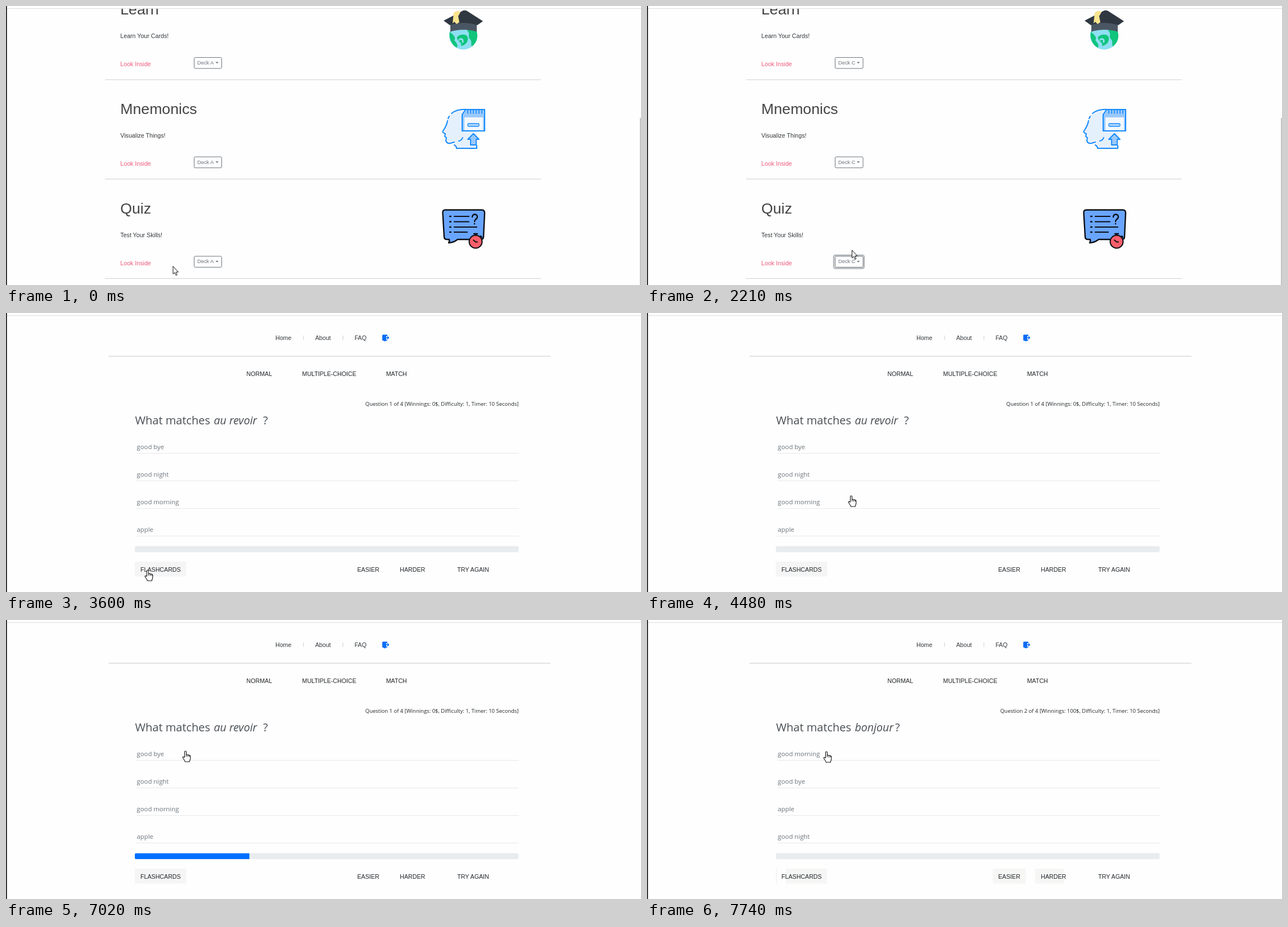
Write an HTML page that moves like this. It is 1129x496 px and loops after 8 s.

```html
<!DOCTYPE html>
<html lang="en">
<head>
<meta charset="utf-8">
<title>Flashcard quiz</title>
<style>
html, body { margin: 0; width: 100%; height: 100%; overflow: hidden; background: #fefefe; }
svg { display: block; width: 1129px; height: 496px; }
text { font: 10.67px "Liberation Sans", Arial, sans-serif; fill: #33383c; white-space: pre; }
.h { font-size: 26.67px; fill: #444; }
.link { fill: #ef5a7c; }
.btn { font-size: 9.33px; fill: #6c757d; }
.ui { font-family: "Open Sans", "Noto Sans", sans-serif; }
.info { font-size: 9.49px; fill: #212529; text-anchor: end; }
.ask { font-size: 20px; fill: #4a4f54; }
.opt { font-size: 11.35px; fill: #6c757d; }
.cap { fill: #212529; }
.rule { stroke: #d3d3d3; }
</style>
</head>
<body>
<svg id="stage" viewBox="0 0 1129 496"></svg>
<script>
const LOOP = 8000, PITCH = 176.7, BAR = 682.5;

// Cursor moves: first change, last change, number of steps, x and y reached
const MOVES = [
  [120, 600, 5, 355, 461], [750, 750, 1, 376, 445], [900, 1140, 3, 388, 425],
  [1700, 1820, 2, 388, 425], [1970, 2210, 3, 364, 434], [2360, 2600, 3, 299, 451],
  [2750, 2750, 1, 281, 453], [2900, 3020, 2, 251, 457], [3170, 3300, 2, 251, 457],
  [3450, 3450, 1, 252, 457], [3600, 3600, 1, 252, 457], [3750, 4480, 7, 363, 325],
  [4630, 4750, 2, 384, 271], [4900, 5140, 3, 383.5, 266], [5420, 5420, 1, 384.5, 266],
  [5570, 5930, 4, 385, 263], [6080, 6210, 2, 386, 263], [6360, 6600, 3, 352, 258],
  [6740, 6740, 1, 333, 245], [6900, 7020, 2, 319, 233], [7170, 7170, 1, 319, 233],
  [7320, 7320, 1, 319, 234], [7470, 7470, 1, 319, 234], [7620, 7740, 2, 319, 234]
];

const text = (x, y, s, cls = '', id = '') => `<text x="${x}" y="${y}" class="${cls}" id="${id}">${s}</text>`;
const rect = (x, y, w, h, fill, more = '') =>
  `<rect x="${x}" y="${y}" width="${w}" height="${h}" fill="${fill}" ${more}/>`;
const path = (d, fill = 'none', stroke = 'none', w = 1, more = '') =>
  `<path d="${d}" fill="${fill}" stroke="${stroke}" stroke-width="${w}" stroke-linejoin="round" stroke-linecap="round" ${more}/>`;
const hline = (x1, x2, y, color, w = 1) => path(`M${x1} ${y}H${x2}`, 'none', color, w);

function gradIcon() {
  return '<circle cx="813" cy="52.5" r="25" fill="#8edff2"/>' +
    path('M814 28C828 29 838 39 838 53C838 61 834 68 828 72C826 66 829 63 825 59C820 54 826 50 821 45Z', '#10c47c') +
    path('M789 46C787 58 792 68 801 74C805 71 801 65 797 61C801 57 795 50 789 46Z', '#10c47c') +
    path('M802 55C807 50 817 49 820 54C824 60 818 70 809 71C812 64 801 63 802 55Z', '#10c47c') +
    path('M806 60C809 57 813 59 812 64', 'none', '#8edff2', 3) +
    path('M790 25H837V46C825 41 802 41 790 46Z', '#4a5663') +
    path('M778 26L813 8Q817 7 820 9L848 27L838 34Q813 26 789 34Z', '#2f3741') +
    path('M796 12Q803 6 808 11L804 18L806 29L801 32L797 28L794 31Z', '#f9e48f');
}

function headIcon() {
  const blue = '#1389fd';
  return path('M811 185C796 186 787 193 784 204C783 211 782 214 777 222Q775 225 781 227L780 232L783 234L782 239Q783 245 790 244C798 241 802 245 801 253H837L838 222H811Z', '#e5f0fd') +
    path('M820 184C807 183 797 187 792 191M788 196L786 200M785 204C784 211 782 215 777 222Q775 225 781 227L780 232L783 234L782 239Q783 245 790 244L797 242M797 247Q801 249 801 253H837V248M805 240Q810 239 812 234', 'none', blue, 2) +
    path('M811 193L817 184H851V222H811Z', '#9ac9fb', blue, 2) +
    path('M821 185v6M826 185v6M831 185v6M836 185v6M841 185v6M846 185v6', 'none', blue, 1.6) +
    rect(815, 198, 33, 23, '#f3f8ff') +
    rect(821, 209, 20, 5, '#b4d7fc', `rx="1.5" stroke="${blue}" stroke-width="1.3"`) +
    path('M831 227L841 237H836V247H826V237H821Z', '#9ac9fb', blue, 1.8);
}

function quizIcon() {
  const ink = '#0b0d12';
  return path('M781 362.5H846Q851 362.5 851 368L849 410Q849 415 844 415H803Q795 421 787 421Q789 419 788 415H784Q779 415 779 410L776.500 368Q776 362.500 781 362.500Z', '#69a5ff', ink, 2.4) +
    path('M797 374H823M797 383.500H823M797 393H837M797 402H820', 'none', ink, 2.2) +
    path('M789 374h2M789 383.500h2M789 393h2M789 402h2', 'none', ink, 2.4) +
    path('M829 375C829 369 838 369 838 375C838 379 833 379 833 383M833 387v.2', 'none', ink, 2.4) +
    path('M832 405H838M835 405V409M844 409L846 411', 'none', ink, 2.4) +
    `<circle cx="835" cy="419" r="11.500" fill="#fb5f6b" stroke="${ink}" stroke-width="2"/>` +
    path('M831 416L835 419.500H838', 'none', ink, 1.8);
}

const deckButton = i => rect(334.5, 91.5, 49, 19.5, '#fefefe', `rx="2" stroke="#6c757d" stroke-width="1" id="btn${i}"`) +
  text(340, 104, 'Deck A', 'btn', 'deck' + i) +
  path('M372.500 99.500h5.400l-2.700 2.800z', '#6c757d', 'none', 1, `id="caret${i}"`);

function section(i, title, line) {
  return `<g transform="translate(0 ${i * PITCH})">` +
    text(203.3, 15.2, title, 'h') + text(203.3, 57.4, line) +
    text(203.3, 107.4, 'Look Inside', 'link', 'link' + i) + deckButton(i) +
    hline(176.5, 950.5, 131, '#cdcdcd') + '</g>';
}

function homePage() {
  return '<g id="home">' +
    rect(332, 443, 54, 23.5, 'none', 'rx="3" stroke="#6c757d" stroke-opacity=".5" stroke-width="2.4" id="ring"') +
    section(0, 'Learn', 'Learn Your Cards!') +
    section(1, 'Mnemonics', 'Visualize Things!') +
    section(2, 'Quiz', 'Test Your Skills!') +
    gradIcon() + headIcon() + quizIcon() +
    '<g id="menu">' + rect(339.5, 368, 105, 74.5, '#fff', 'rx="2.5" stroke="#d9dde2"') +
    rect(340, 416.5, 104, 21.3, '#e9ecef', 'id="hover"') +
    ['A', 'B', 'C'].map((c, i) => text(350.2, 387.8 + i * 21.3, 'Deck ' + c, 'cap')).join('') + '</g>' +
    rect(1127, 199, 2, 297, '#c4c4c4') + '</g>';
}

function quizPage() {
  const nav = text(479, 48, 'Home') + text(549.7, 48, 'About') + text(619.7, 48, 'FAQ') +
    path('M529 40.500V47.500M599 40.500V47.500', 'none', '#ccc') +
    path('M670 38.500H678V41H676V47.500H678V49H676L674 50.500L669 48.500V39.500Z', '#0a6cf5') +
    path('M676 44H680.500M678.500 42L680.500 44L678.500 46', 'none', '#0a6cf5', 1.6);
  const tabs = [[427.5, 'NORMAL'], [526.5, 'MULTIPLE-CHOICE'], [675.7, 'MATCH']]
    .map(([x, s]) => text(x, 112, s, 'cap')).join('');
  const buttons = [[239, 'FLASHCARDS'], [624.5, 'EASIER'], [700.3, 'HARDER'], [802.3, 'TRY AGAIN']]
    .map(([x, s]) => text(x, 460, s, 'cap')).join('');
  const options = [0, 1, 2, 3].map(i =>
    text(232.5, 241.5 + i * 49, '', 'ui opt', 'opt' + i) + hline(232, 911.5, 249.5 + i * 49, '#e7e8e9')).join('');
  return '<g id="quiz">' + nav + hline(183, 967.5, 76.7, '#dadada', 1.5) + tabs +
    text(911.5, 164.6, '', 'ui info', 'info') +
    text(229.5, 197.6, 'What matches', 'ui ask') +
    `<text x="369.5" y="197.6" class="ui ask" style="font-style:italic;font-size:19.6px" id="word"></text>` +
    text(457, 197.6, '?', 'ui ask', 'mark') + options +
    rect(229, 414.5, BAR, 10.7, '#e9ecef', 'rx="2.7"') +
    rect(229, 414.5, 0, 10.7, '#0070ff', 'id="bar" clip-path="url(#track)"') +
    rect(229, 442, 91.5, 26.5, '#f5f5f5', 'rx="2" id="flash"') +
    rect(229, 442, 2.5, 26.5, '#f5f5f5') +
    '<g id="extra">' + rect(247, 442, 73, 26.5, '#f6f6f5', 'rx="1"') +
    rect(614.5, 442, 59, 26.5, '#f6f6f5', 'rx="2"') + rect(690, 442, 52, 26.5, '#f6f6f5', 'rx="1"') + '</g>' +
    buttons + '</g>';
}

const stage = document.getElementById('stage');
stage.innerHTML =
  `<defs><clipPath id="track">${rect(229, 414.5, BAR, 10.7, '#000', 'rx="2.7"')}</clipPath></defs>` +
  rect(0, 0, 1129, 496, '#fefefe') + homePage() + quizPage() +
  rect(0, 0, 1129, 5, '#fff') + hline(0, 1129, 4.5, '#dcdcdc') + rect(0, 0, 1.6, 496, '#0c0c0c') +
  '<g id="cursor">' +
  path('M.5 .5V14L3.500 11.300L5.700 16.300L7.800 15.400L5.600 10.500H9.500Z', '#fff', '#111', 1, 'id="arrow"') +
  '<g id="hand">' +
  path('M-1.500 11V1.500a1.500 1.500 0 0 1 3 0V7c.3-1.200 2.800-1 2.900.4c.4-1 2.600-.8 2.700.6c.5-.8 1.700-.4 1.700 1v4c0 2-1.300 3-1.500 6h-8c-.4-2.500-2.700-5-3.900-7c-.8-1.400.8-2.500 1.800-1.400z', '#fff', '#111', 1.1) +
  path('M1.500 7v2.500M4.400 7.400v2.500M7.100 8v2', 'none', '#111') + '</g></g>';

const el = {};
stage.querySelectorAll('[id]').forEach(n => { if (n.id) el[n.id] = n; });
const show = (n, on) => { n.style.display = on ? '' : 'none'; };
const write = (n, s) => { if (n.textContent !== s) n.textContent = s; };
const inside = (p, x1, y1, x2, y2) => p.x >= x1 && p.x <= x2 && p.y >= y1 && p.y <= y2;

// Cursor place and the moment of the latest screen step
function stepAt(t) {
  let x = 296.5, y = 462.5, time = 0;
  for (const [t0, t1, n, tx, ty] of MOVES) {
    if (t < t0) break;
    const gap = n > 1 ? (t1 - t0) / (n - 1) : 1;
    const k = Math.min(n - 1, Math.floor((t - t0) / gap + 0.001));
    const f = (k + 1) / n;
    x += (tx - x) * f;
    y += (ty - y) * f;
    time = t0 + k * gap;
  }
  return { x, y, time };
}

// cubic-bezier(.25, .1, .25, 1)
function ease(x) {
  if (x <= 0) return 0;
  if (x >= 1) return 1;
  const curve = (a, b, s) => 3 * a * s * (1 - s) ** 2 + 3 * b * s * s * (1 - s) + s ** 3;
  let lo = 0, hi = 1;
  for (let i = 0; i < 20; i++) {
    const mid = (lo + hi) / 2;
    if (curve(.25, .25, mid) < x) lo = mid; else hi = mid;
  }
  return curve(.1, 1, lo);
}

function barWidth(t) {
  const ticks = [4550, 5515, 6515].reduce((sum, t0) => sum + ease((t - t0) / 600), 0);
  return BAR / 10 * ticks * (1 - ease((t - 7110) / 540));
}

function drawHome(t, p) {
  const open = t >= 600 && t < 1820;
  const onMenu = open && inside(p, 340, 374, 444, 438);
  const onButton = inside(p, 334, 444.5, 384.5, 465);
  const onLink = inside(p, 203, 450, 258, 465);
  const deck = t >= 1820 ? 'Deck C' : 'Deck A';
  for (let i = 0; i < 3; i++) {
    write(el['deck' + i], deck);
    el['btn' + i].setAttribute('width', t >= 1820 ? 49.6 : 49);
    el['caret' + i].setAttribute('transform', `translate(${t >= 1820 ? .5 : 0} 0)`);
  }
  el.btn2.setAttribute('fill', onButton ? '#6c757d' : '#fefefe');
  el.deck2.style.fill = el.caret2.style.fill = onButton ? '#fff' : '#6c757d';
  el.link2.style.fill = onLink ? '#0056b3' : '';
  show(el.menu, open);
  show(el.hover, onMenu);
  el.hover.setAttribute('y', 374 + 21.3 * Math.floor((p.y - 374) / 21.3));
  show(el.ring, (t >= 600 && t < 1700) || (t >= 1970 && t < 3300));
  return onMenu || onButton || (onLink && t < 3450);
}

function drawQuiz(t, p) {
  const second = t >= 7170;
  write(el.info, `Question ${second ? 2 : 1} of 4 [Winnings: ${second ? 100 : 0}$, Difficulty: 1, Timer: 10 Seconds]`);
  write(el.word, second ? 'bonjour' : 'au revoir');
  el.mark.setAttribute('x', second ? 441 : 457);
  const options = second ? ['good morning', 'good bye', 'apple', 'good night']
    : ['good bye', 'good night', 'good morning', 'apple'];
  options.forEach((s, i) => write(el['opt' + i], s));
  el.bar.setAttribute('width', barWidth(t));
  show(el.flash, !second);
  show(el.extra, t >= 7470);
  const onOption = inside(p, 229, 219, 912, 397) && (p.y - 219) % 49 < 31;
  return onOption || inside(p, 229, 442, 320, 468);
}

function draw(now) {
  const p = stepAt(now % LOOP), t = p.time + 0.01;
  const quiz = t >= 3600;
  show(el.home, !quiz);
  show(el.quiz, quiz);
  const hand = quiz ? drawQuiz(t, p) : drawHome(t, p);
  show(el.hand, hand);
  show(el.arrow, !hand);
  el.cursor.setAttribute('transform', `translate(${p.x} ${p.y})`);
}

const start = performance.now();
function tick() {
  draw(performance.now() - start);
  requestAnimationFrame(tick);
}
tick();
</script>
</body>
</html>
```
